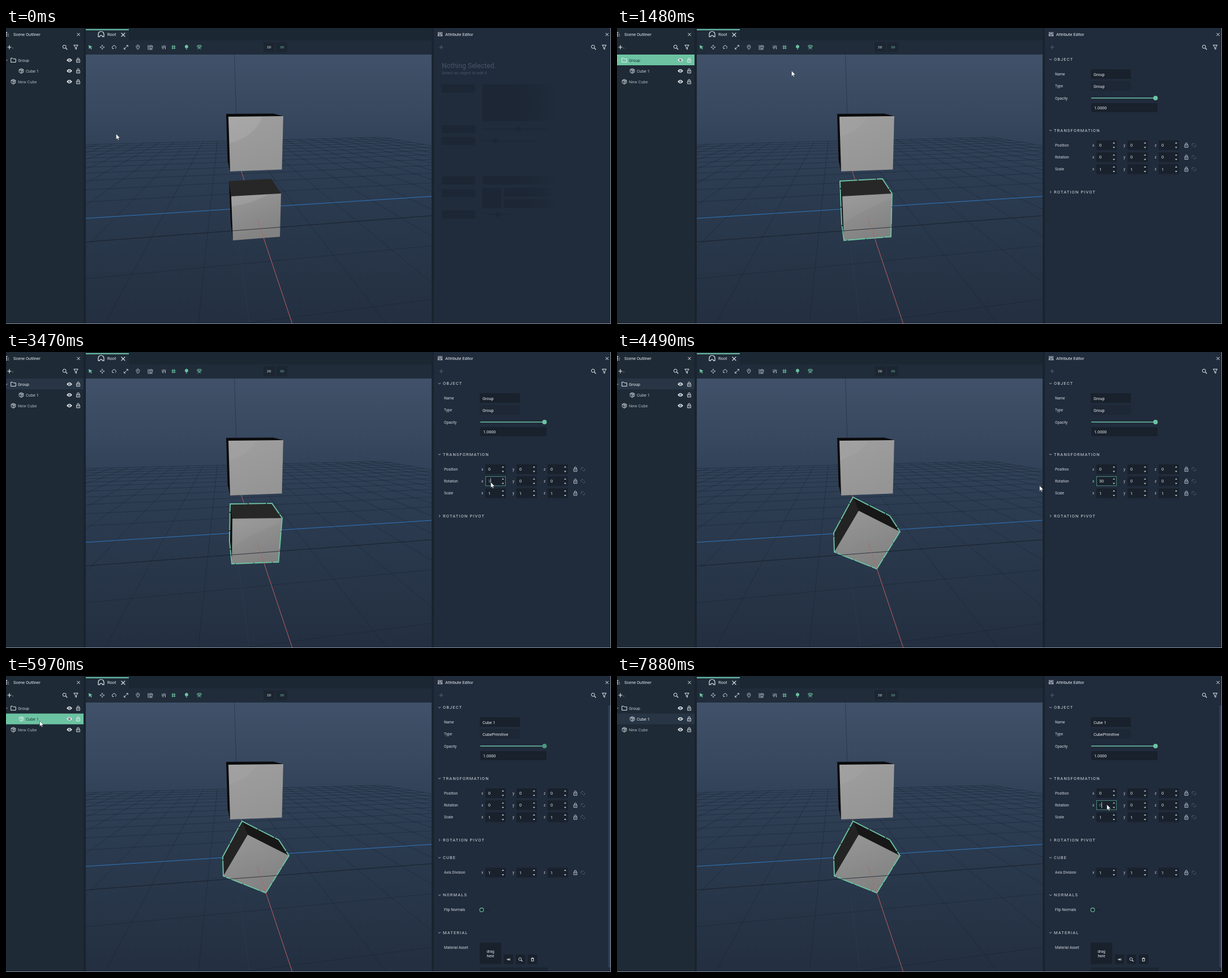
Animation of 1069 by 524 pixels, one loop 8000 ms. Source, as an HTML page:

```html
<!DOCTYPE html>
<html lang="en">
<head>
<meta charset="utf-8">
<title>Scene editor</title>
<style>
  html, body { margin: 0; width: 100%; height: 100%; overflow: hidden; background: #202b3b; }
  svg { display: block; width: 100vw; height: 100vh; font-family: Roboto, sans-serif; }
  text { white-space: pre; }
</style>
</head>
<body>
<svg id="stage" viewBox="0 0 1069 524" preserveAspectRatio="none"></svg>
<script>
const GREEN = '#6cc3a2', DARK = '#18212c', WHITE = '#e8ecf0', SOFT = '#c3cbd4', MARKED = '#273544';

// ---- markup helpers ----
const rect = (x, y, w, h, fill, extra = '') =>
  `<rect x="${x}" y="${y}" width="${w}" height="${h}" fill="${fill}" ${extra}/>`;
const path = (d, stroke = WHITE, width = 1, extra = '') =>
  `<path d="${d}" fill="none" stroke="${stroke}" stroke-width="${width}" ${extra}/>`;
const shape = (d, fill, extra = '') => `<path d="${d}" fill="${fill}" ${extra}/>`;
const dot = (x, y, r, fill, extra = '') => `<circle cx="${x}" cy="${y}" r="${r}" fill="${fill}" ${extra}/>`;
const group = (id, body, extra = '') => `<g id="${id}" ${extra}>${body}</g>`;
const text = (x, y, s, size = 7.4, fill = SOFT, extra = '') =>
  `<text x="${x}" y="${y + size * .36}" font-size="${size}" fill="${fill}" ${extra}>${s}</text>`;
const icon = (name, x, y, color = WHITE, scale = 1) =>
  `<g transform="translate(${x} ${y}) scale(${scale})" fill="none" stroke="${color}" color="${color}">${icons[name]}</g>`;
const poly = pts => 'M' + pts.map(p => p.join(' ')).join('L') + 'Z';

const icons = {
  close: '<path d="M-2.6-2.6L2.6 2.6M2.6-2.6L-2.6 2.6"/>',
  plus: '<path d="M-3.5 0H3.5M0-3.5V3.5" stroke-width="1.2"/>',
  search: '<circle cx="-.8" cy="-.8" r="2.9"/><path d="M1.4 1.4L4.2 4.2" stroke-width="1.3"/>',
  funnel: '<path d="M-3.7-3.7H3.7L1 0V3.8L-1 2.6V0Z"/>',
  eye: '<path d="M-4.8 0Q0-6.4 4.8 0Q0 6.4-4.8 0Z" fill="currentColor" stroke="none"/><circle r="1.5" stroke="#202b38"/>',
  lock: '<path d="M-3-.8H3V4H-3ZM-1.8-.8V-2.4A1.8 1.8 0 0 1 1.8-2.4V-.8"/><circle cy="1.6" r=".8" fill="currentColor" stroke="none"/>',
  folder: '<path d="M-4.3-3.6H-1.2L0-2.3H4.3V3.6H-4.3Z"/>',
  cube: '<path d="M-3.8-2.4L0-4.2L3.8-2.4V2.2L0 4.4L-3.8 2.2ZM-3.8-2.4L-.4-.6L3.8-2.4M-.4-.6V4.2M-2-3.2L1.8-1.4V3" stroke-width=".8"/>',
  down: '<path d="M-2.2-1.1L0 1.1L2.2-1.1"/>',
  right: '<path d="M-1.1-2.2L1.1 0L-1.1 2.2"/>',
  tune: '<path d="M-3-4V4M0-4V4M3-4V4M-4.2 1.5H-1.8M-1.2-1.5H1.2M1.8 2H4.2" stroke-width="1.1"/>',
  tree: '<path d="M-2.5-4V4M-2.5-3H1M-2.5 0H2M-2.5 3H2" stroke-dasharray="2 1.2"/>',
  dome: '<path d="M-5 4.5V0A5 5 0 0 1 5 0V4.5H2.5A2.5 2.5 0 0 0-2.5 4.5Z" stroke-width="1.2"/>',
  arrow: '<path d="M-3-3.8L3.6-.8L.9.4L2.8 3L1.5 3.9L-.4 1.3L-2.3 3.2Z" fill="currentColor" stroke="none"/>',
  move: '<path d="M-3.6 0H3.6M0-3.6V3.6" stroke-dasharray="2.6 2"/><path d="M-2.6-1.2L-3.8 0L-2.6 1.2M2.6-1.2L3.8 0L2.6 1.2M-1.2-2.6L0-3.8L1.2-2.6M-1.2 2.6L0 3.8L1.2 2.6"/>',
  turn: '<path d="M-2.4 2.6A3.3 3.3 0 1 1 2.4 2.6M-3.6.8L-2.4 2.8L-.4 2"/>',
  scale: '<path d="M-3.2 3.2L3.2-3.2M.6-3.4H3.4V-.6M-3.4.6V3.4H-.6"/>',
  pin: '<path d="M0 4C-5-1-2.4-3.8 0-3.8S5-1 0 4Z"/><circle cy="-1" r=".9" fill="currentColor" stroke="none"/>',
  box: '<path d="M-4-4V4H4M-2-2.2L1-3.4L4-2.2V1.6L1 3L-2 1.6ZM-2-2.2L1-.8L4-2.2M1-.8V3" stroke-width=".8"/>',
  snap: '<path d="M-1.6 3.6V1A2 2 0 0 1 2.4 1V3.6M-3.6-2.6L-2.4-1.4M0-3.6V-2M3.4-2.4L2.4-1.4M-4 .6H-2.8" stroke-width="1.1"/>',
  grid: '<path d="M-1.4-3.6V3.6M1.6-3.6V3.6M-3.6-1.4H3.6M-3.6 1.6H3.6"/>',
  bulb: '<path d="M-1 1.6C-3.8-.6-2.4-3.8 0-3.8S3.8-.6 1 1.6Z" fill="currentColor"/><path d="M-1.2 3.4H1.2"/>',
  light: '<path d="M-4-1.2H4L2.8-3.4H-2.8ZM-3 .6H3M0 .6V3M-2.8 3.8L-1.4 2M2.8 3.8L1.4 2"/>',
  link: '<path d="M-1-3A2.2 2.2 0 0 0-2.6 1M1 3A2.2 2.2 0 0 0 2.8-.6M-.8-3L1-2M-1 2L1 3"/>',
  into: '<path d="M-3.5 0H1M-.8-1.8L1.2 0L-.8 1.8M3-2.4V2.4" stroke-width="1.2"/>',
  bin: '<path d="M-2.2-2H2.2V3.4H-2.2ZM-3-2.2H3M-1-3.4H1" stroke-width="1.1"/>'
};

// ---- viewport ----
const project = (u, v) => {
  const p = u * .0244, q = v * .176, w = 1 + p + q;
  return [(437.2 + p * 3500 + q * 379.2) / w, (318.1 + p * 123 + q * 144) / w].map(n => +n.toFixed(1));
};
const seg = (a, b) => `M${a}L${b}`;
const SIZE = 12;
const alongV = u => seg(project(u, SIZE), project(u, Math.max(-SIZE, (-.97 - u * .0244) / .176)));
const alongU = v => seg(project(SIZE, v), project(Math.max(-SIZE, (-.97 - v * .176) / .0244), v));

function grid() {
  let d = '';
  for (let i = -SIZE; i <= SIZE; i++) {
    if (i) d += alongV(i);
    if (i && i > -6) d += alongU(i);
  }
  return path(d, '#182230', .65, 'opacity=".75"') +
    path('M403.5 47L407 160', '#1b2635', .7, 'opacity=".7"') + path('M412 385L430 524', '#3a4759', .7, 'opacity=".5"') +
    path(alongU(0), '#2f7fd0', .9) + path(seg(project(0, SIZE), project(0, 0)), '#c4605f', .9);
}

const UPPER = 'M393 157L490 156L487.5 250.5L396 254Z';
const upperCube = shape('M389 152L472 151.5L490 156L487 250L396 254L391.5 235Z', '#0b0b0c') +
  shape(UPPER, 'url(#upperFace)');

// corners: back-left, back-right, front-right, front-left, bottom-right, bottom-left, back-bottom-left
const poses = [
  [[394, 271], [469, 267], [486, 293], [398, 298], [484, 369.5], [401, 376], [397, 345]],
  [[396, 269], [470, 268], [488, 294], [400, 295], [481.5, 372], [399, 375], [395, 335]],
  [[417, 257], [482, 290], [500, 318], [427, 281], [459, 384], [384, 354], [383, 320]]
];
function lowerCube([a, b, c, d, e, f, g], i) {
  const [top, side] = i < 2 ? ['#272727', '#090909'] : ['#171717', '#232323'];
  return group('pose' + i,
    shape(poly([a, d, f, g]), side) + shape(poly([a, b, c, d]), top) +
    shape(poly([d, c, e, f]), 'url(#lowerFace)') +
    group('edge' + i, path(poly([a, b, c, e, f, g]), GREEN, 1.9, 'stroke-dasharray="31 1.6"')));
}

const viewport = `<g clip-path="url(#view)">` + rect(141, 47, 611, 477, 'url(#sky)') + grid() + upperCube +
  poses.map(lowerCube).join('') +
  group('glare', shape('M393 157H453Q440 192 395 204Z', '#fff') + shape('M398 298L466 294Q437 310 399 316Z', '#fff'), 'opacity=".09"') +
  group('softGlare', shape('M393 157H443Q430 181 394 192Z', '#fff'), 'opacity=".035"') +
  group('lowGlare', shape('M400 298L485 295V303Q445 316 401 345Z', '#fff'), 'opacity=".035"') +
  path(alongU(-1), '#1b232d', .8) +
  path(seg(project(0, -.556), [455, 371]), '#b5605e', .9, 'opacity=".75"') +
  path(seg([455, 371], project(0, -5)), '#cc6562', .9) + '</g>';

// ---- left panel and toolbar ----
const tools = [['arrow', 149, 1], ['move', 170], ['turn', 191], ['scale', 212], ['pin', 233], ['box', 255],
  ['snap', 279], ['grid', 296, 1], ['bulb', 319, 1], ['light', 341.5, 1]];
const row = (i, x, name, kind) => {
  const y = 57 + i * 19;
  return icon(kind, x - 8, y) + text(x, y, name, 7.4, '#a5b1be', `id="label${i}"`) +
    icon('eye', 112, y) + icon('lock', 127.5, y, WHITE, .95);
};

const chrome = rect(0, 0, 1069, 524, '#1a232f') + rect(0, 0, 137, 524, '#1e2a36') +
  rect(141, 0, 611, 47, '#1c2734') + rect(141, 22, 611, 25, '#202c3a') + rect(141, 2, 76, 21, '#202c3a') +
  rect(141, 2, 76, 2, GREEN) + rect(756, 0, 313, 524, '#202b3b') +
  icon('tree', 3, 11) + text(13, 11.5, 'Scene Outliner', 7.4, WHITE) + icon('close', 128, 11.5) +
  icon('plus', 6, 34) + rect(11.5, 35, 1, 1, WHITE) + icon('search', 104, 34) + icon('funnel', 123.5, 34) +
  icon('dome', 168, 11) + text(179, 11.5, 'Root', 7.4, WHITE) + icon('close', 207, 12, WHITE, 1.3) +
  tools.map(([n, x, on]) => icon(n, x, 34, on ? GREEN : SOFT)).join('') +
  rect(455, 25, 20, 18, '#1c2632') + rect(477, 25, 20, 18, '#1c2632') +
  text(461, 34, '2D', 6.2, WHITE) + text(484, 34, '3D', 6.2, GREEN) +
  icon('tune', 767, 11) + text(776, 11.5, 'Attribute Editor', 7.4, WHITE) + icon('close', 1062, 11.5) +
  icon('plus', 769, 34, '#536071') + icon('search', 1038, 34) + icon('funnel', 1057, 34);

const outliner = rect(0, 47, 137, 19, 'none', 'id="row0"') + rect(0, 66.5, 137, 19, 'none', 'id="row1"') +
  icon('down', 1, 57, SOFT, .8) + row(0, 21, 'Group', 'folder') + row(1, 35, 'Cube 1', 'cube') + row(2, 21, 'New Cube', 'cube');

// ---- attribute panel ----
const SHADE = '#1c2634', FADE = 'url(#fade)';
const track = (y, x, end) => path(`M842 ${y}H${end}`, SHADE, 1.2) + dot(x, y, 4, SHADE);
const empty = text(770, 67, 'Nothing Selected.', 12.2, '#485669') + text(770, 79.5, 'Select an object to edit it', 7.3, '#485669') +
  [100, 172, 193, 263, 285, 323].map(y => rect(770, y, 59, 14, SHADE, 'rx="1"')).join('') +
  rect(842, 100, 132, 65, FADE) + track(179, 906, 955) + track(200, 864, 935) + track(330, 869, 900) +
  rect(842, 262, 132, 15, FADE) + rect(842, 283, 33, 36, SHADE) + rect(880, 283, 94, 15, FADE) + rect(880, 303, 94, 15, FADE);

const heading = (y, s, arrow = 'down') => icon(arrow, 766, y, SOFT, .9) + text(772, y, s, 7.4, '#d5dbe1', 'letter-spacing="1.2"');
const label = (y, s) => text(774, y, s, 6.6, '#d0d6dd');
function vector(y, name, value, id = '') {
  let out = label(y, name);
  ['x', 'y', 'z'].forEach((axis, i) => {
    const x = 847 + i * 55;
    out += text(x - 7, y, axis, 6.6) + rect(x, y - 8.5, 36, 17, DARK, 'rx="1"') +
      text(x + 5, y, value, 7.3, WHITE, id && !i ? `id="${id}"` : '') +
      shape(`M${x + 29} ${y - 3}h4l-2-2.4ZM${x + 29} ${y + 3}h4l-2 2.4Z`, SOFT);
  });
  return out + icon('lock', 1006, y, SOFT, .95) + icon('link', 1019.5, y, '#566272');
}

const attrs = heading(55.7, 'OBJECT') +
  label(82, 'Name') + rect(837, 73, 71, 17, DARK) + text(842, 82, 'Group', 7.3, WHITE, 'id="name"') +
  label(103, 'Type') + rect(837, 94, 71, 17, '#1d2735') + text(842, 103, 'Group', 7.3, WHITE, 'id="type"') +
  label(124.5, 'Opacity') + path('M838 124H952', GREEN, 1.5) + dot(951.5, 124, 4, GREEN, 'id="knob"') +
  rect(838, 133, 117, 16, DARK) + text(843, 141.3, '1.0000', 7.3, WHITE) +
  heading(181.3, 'TRANSFORMATION') + vector(207.5, 'Position', 0) + vector(228.8, 'Rotation', 0, 'angle') + vector(250, 'Scale', 1) +
  rect(847.4, 220.4, 35, 16.4, 'none', 'id="focus" stroke="#58a58b" stroke-width=".8"') + rect(856, 223, 1, 11, '#aab3bd', 'id="caret"') +
  heading(290.3, 'ROTATION PIVOT', 'right');

const cubeAttrs = heading(321.6, 'CUBE') + vector(348, 'Axis Division', 1) +
  heading(387.8, 'NORMALS') + label(414, 'Flip Normals') + path('M844 414H854', '#151e28', 1.2) + dot(840.5, 414, 3.4, '#1a2430', `stroke="${GREEN}" stroke-width="1.1"`) +
  heading(454.4, 'MATERIAL') + label(480.5, 'Material Asset') + rect(837, 472, 38, 38, DARK, 'rx="1"') +
  text(856, 487.5, 'drag', 6.7, WHITE, 'text-anchor="middle"') + text(856, 496, 'here', 6.7, WHITE, 'text-anchor="middle"') +
  ['into', 'search', 'bin'].map((n, i) => rect(879.5 + i * 21.3, 493, 16.5, 17, DARK, 'rx="1"') + icon(n, 887.7 + i * 21.3, 501.8, WHITE, .85)).join('') +
  rect(837, 516, 120, 8, '#1b2532') + rect(1064.5, 52, 3.5, 464, '#34435a');

// ---- assemble ----
const gradient = (id, stops, dir) => `<linearGradient id="${id}" ${dir}>` +
  stops.map(([o, c, a = 1]) => `<stop offset="${o}" stop-color="${c}" stop-opacity="${a}"/>`).join('') + '</linearGradient>';
const vertical = 'x1="0" y1="0" x2="0" y2="1"', diagonal = 'x1="0" y1="0" x2=".4" y2="1"';
const $ = id => document.getElementById(id);

$('stage').innerHTML = '<defs><clipPath id="view"><rect x="141" y="47" width="611" height="477"/></clipPath>' +
  gradient('sky', [[0, '#405169'], [.22, '#37485f'], [.46, '#2c3c51'], [.72, '#283649'], [1, '#232f41']], vertical) +
  gradient('upperFace', [[0, '#9f9f9f'], [1, '#959595']], diagonal) +
  gradient('lowerFace', [[0, '#989898'], [1, '#828282']], diagonal) +
  gradient('fade', [[0, SHADE], [.4, SHADE], [1, SHADE, 0]], '') + '</defs>' +
  chrome + viewport + outliner + group('empty', empty) + group('attrs', attrs) + group('cubeAttrs', cubeAttrs) +
  path('M0 523.5H1068.5V0', '#8a919a') +
  group('cursor', shape('M-.4-.6V9.2L1.8 7.2L3.3 10.5L4.7 9.8L3.3 6.7H6.5Z', '#fff', 'stroke="#17202b" stroke-width=".5"'));

// ---- animation ----
// pointer stops: time, x, y
const trail = [[0, 195, 188], [70, 195, 188], [250, 150, 150], [420, 85, 98], [550, 46, 72], [690, 32, 63],
  [1160, 32, 63], [1320, 140, 66], [1480, 308, 76], [1800, 570, 128], [2140, 775, 188], [2420, 840, 222], [2700, 857, 231],
  [3749, 857, 231], [3750, 888, 183], [4270, 888, 183], [4480, 760, 236], [4700, 500, 256], [4900, 270, 190], [5080, 110, 104], [5280, 60, 80],
  [6290, 60, 80], [6480, 170, 130], [6700, 440, 225], [6900, 690, 244], [7120, 835, 234], [7350, 866, 228], [8000, 866, 228]];

function pointer(t) {
  const i = trail.findIndex(k => k[0] > t), [t0, x0, y0] = trail[i - 1], [t1, x1, y1] = trail[i];
  const k = (t - t0) / (t1 - t0);
  return [x0 + (x1 - x0) * k, y0 + (y1 - y0) * k];
}
const show = (id, on) => $(id).setAttribute('display', on ? 'inline' : 'none');
const fill = (id, color) => $(id).setAttribute('fill', color);

// a row is active right after its click, then marked once the focus moves on
function paintRow(i, active, marked, hover) {
  fill('row' + i, active ? GREEN : marked ? MARKED : hover ? '#35435a' : 'none');
  fill('label' + i, active ? '#1e2f38' : marked ? WHITE : SOFT);
}

function draw(t) {
  const within = (a, b) => t >= a && t < b;
  const [x, y] = pointer(t);
  $('cursor').setAttribute('transform', `translate(${x.toFixed(1)} ${y.toFixed(1)})`);

  const over = (top, bottom) => x < 137 && y >= top && y < bottom;
  paintRow(0, within(950, 2880), within(2880, 5420), over(47, 66));
  paintRow(1, within(5420, 7350), t >= 7350, over(66, 86));

  const pose = t < 3470 ? 0 : t < 3750 ? 1 : 2;
  poses.forEach((_, i) => { show('pose' + i, i == pose); show('edge' + i, t >= 950); });
  show('glare', t < 950);
  show('softGlare', t >= 950);
  show('lowGlare', within(950, 3750));

  const cube = t >= 5710;
  show('empty', t < 1210);
  show('attrs', t >= 1210);
  show('cubeAttrs', cube);
  $('name').textContent = cube ? 'Cube 1' : 'Group';
  $('type').textContent = cube ? 'CubePrimitive' : 'Group';
  $('angle').textContent = cube || t < 3470 ? '0' : t < 3750 ? '3' : '30';
  fill('angle', within(3030, 3750) || t >= 7590 ? '#87919c' : WHITE);
  fill('knob', within(5710, 6120) ? '#4a967d' : GREEN);
  show('focus', within(2880, 5710) || t >= 7470);
  show('caret', within(3170, 3750) || t >= 7880);
}

const start = performance.now();
(function tick() {
  draw((performance.now() - start) % 8000);
  requestAnimationFrame(tick);
})();
</script>
</body>
</html>
```
